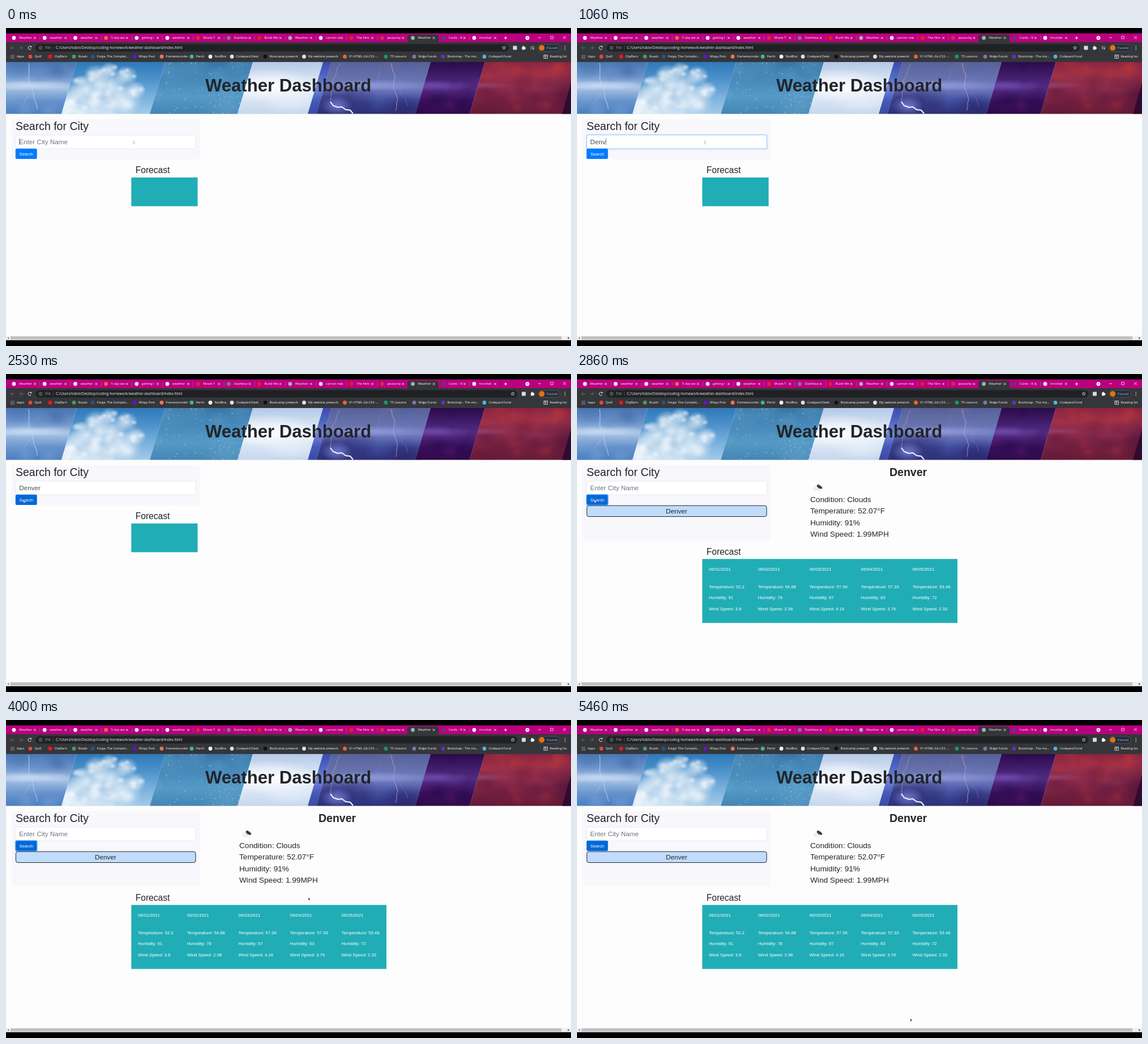
Write an HTML page with a canvas that moves like this. It is 998 by 561 pixels and loops after 5.53 s.

```html
<!DOCTYPE html>
<html lang="en">
<head>
<meta charset="utf-8">
<title>Weather Dashboard</title>
<style>
html, body { margin: 0; width: 100%; height: 100%; overflow: hidden; background: #000; }
canvas { display: block; }
</style>
</head>
<body>
<canvas id="stage" width="998" height="561"></canvas>
<script>
const LOOP = 5530, STEP = 200 / 3;
const PAGE = '"Liberation Sans", Arial, sans-serif';
const UI = '"Open Sans", "Noto Sans", sans-serif';
const INK = '#212529';
const stage = document.getElementById('stage');
const screen = stage.getContext('2d');
const backdrop = document.createElement('canvas');
backdrop.width = 998;
backdrop.height = 561;
let c = backdrop.getContext('2d');

let seed = 7;
const rnd = () => (seed = seed * 16807 % 2147483647) / 2147483647;
const between = (a, b) => a + (b - a) * rnd();

// cy is the middle of the capital letters
function text(s, x, cy, size, color = INK, font = PAGE, weight = 400) {
  c.font = `${weight} ${size}px ${font}`;
  c.fillStyle = color;
  c.fillText(s, x, cy + size * .358);
}
function rect(x, y, w, h, color) {
  c.fillStyle = color;
  c.fillRect(x, y, w, h);
}
function round(x, y, w, h, r, fill, stroke, width = 1) {
  c.beginPath();
  c.roundRect(x, y, w, h, r);
  if (fill) { c.fillStyle = fill; c.fill(); }
  if (stroke) { c.strokeStyle = stroke; c.lineWidth = width; c.stroke(); }
}
function dot(x, y, r, color) {
  c.beginPath();
  c.arc(x, y, r, 0, 7);
  c.fillStyle = color;
  c.fill();
}
function line(points, color, width = .8) {
  c.beginPath();
  points.forEach(([x, y]) => c.lineTo(x, y));
  c.strokeStyle = color;
  c.lineWidth = width;
  c.stroke();
}
function shape(points, color) {
  c.beginPath();
  points.forEach(([x, y]) => c.lineTo(x, y));
  c.fillStyle = color;
  c.fill();
}
function cross(x, y, r, color, width) {
  line([[x - r, y - r], [x + r, y + r]], color, width);
  line([[x - r, y + r], [x + r, y - r]], color, width);
}
// soft spot of colour: rgb is "r,g,b"
function glow(x, y, rx, ry, rgb, alpha) {
  c.save();
  c.translate(x, y);
  c.scale(rx, ry);
  const g = c.createRadialGradient(0, 0, 0, 0, 0, 1);
  g.addColorStop(0, `rgba(${rgb},${alpha})`);
  g.addColorStop(.45, `rgba(${rgb},${alpha * .6})`);
  g.addColorStop(1, `rgba(${rgb},0)`);
  c.fillStyle = g;
  c.fillRect(-1, -1, 2, 2);
  c.restore();
}
function glows(n, x0, x1, y0, y1, size, rgb, alpha) {
  for (let i = 0; i < n; i++) {
    const r = between(size * .5, size);
    glow(between(x0, x1), between(y0, y1), r * 1.3, r, rgb, alpha);
  }
}
function bolt(x, y, dx, dy, n, color, width) {
  const points = [[x, y]];
  for (let i = 0; i < n; i++) {
    x += dx + between(-3, 3);
    y += dy + between(-1, 1);
    points.push([x, y]);
  }
  line(points, color, width);
}
// slanted strip of the banner between two top edges
const LEAN = 27, TOP = 60, BOTTOM = 151.4;
function strip(x0, x1, colors, paint) {
  c.save();
  c.beginPath();
  [[x0, TOP], [x1, TOP], [x1 - LEAN, BOTTOM], [x0 - LEAN, BOTTOM]].forEach(p => c.lineTo(...p));
  c.clip();
  const g = c.createLinearGradient(0, TOP, 0, BOTTOM);
  colors.forEach((col, i) => g.addColorStop(i / (colors.length - 1), col));
  rect(x0 - LEAN, TOP, x1 - x0 + LEAN, 92, g);
  if (paint) paint();
  c.restore();
}

function drawBanner() {
  strip(-1, 125, ['#4a76b4', '#6f98cf', '#a9c3e6', '#6592cb', '#4c7fc0'], () => {
    glows(10, 0, 125, 60, 88, 22, '60,100,160', .2);
    glows(8, 0, 110, 110, 150, 20, '130,168,216', .25);
    glow(40, 101, 85, 9, '222,234,250', .65);
    bolt(40, 62, .6, 7, 12, '#c3d7f3', .9);
    bolt(46, 100, -1.6, 6, 5, '#aec8ec', .6);
  });
  strip(125, 281, ['#2f79b9', '#4d92cb', '#79b0dd', '#a3cae8'], () => {
    const puffs = [
      [118, 128, 24], [142, 108, 22], [160, 84, 17], [184, 102, 23], [212, 84, 15],
      [205, 128, 25], [160, 138, 24], [228, 110, 14], [110, 146, 18], [182, 74, 12]
    ];
    puffs.forEach(([x, y, r]) => {
      glow(x, y, r * 1.4, r * 1.2, '255,255,255', .75);
      glows(3, x - r, x + r, y - r * .7, y + r * .7, r * .5, '250,252,255', .55);
    });
    glows(6, 110, 215, 115, 148, 11, '165,192,222', .35);
  });
  strip(281, 436, ['#3676a7', '#4689ba', '#559ac6', '#4485b4'], () => {
    glows(10, 260, 430, 60, 150, 28, '115,175,212', .25);
    for (let i = 0; i < 170; i++)
      dot(between(256, 436), between(60, 152), between(.3, 1.1), `rgba(225,240,252,${between(.15, .65)})`);
  });
  strip(436, 560, ['#b4c8e6', '#cddcf0', '#eef4fc', '#d8e4f4', '#c6d6ed'], () => {
    glow(465, 101, 85, 30, '255,255,255', .8);
    glow(500, 130, 50, 22, '238,245,255', .5);
  });
  strip(560, 575, ['#3d4cab', '#4d65c4', '#7484d8', '#4459b8', '#3b49a6']);
  strip(575, 750, ['#515f9b', '#6270ae', '#727dbf', '#424f9f', '#2d3079'], () => {
    glows(12, 560, 745, 62, 90, 26, '105,105,150', .25);
    glows(12, 560, 740, 118, 152, 28, '42,36,104', .35);
    glow(645, 101, 110, 10, '175,180,240', .5);
    glow(584, 137, 28, 18, '150,165,255', .6);
    line([[573, 130], [578, 137], [586, 140], [593, 139], [600, 144], [608, 145], [613, 151]], '#f5f5ff', 2);
    bolt(590, 63, -2, 7, 10, '#a8abe4', .6);
    bolt(680, 62, 1, 7, 12, '#b8a9e2', .8);
    bolt(688, 82, 3, 6, 9, '#927fc9', .5);
    bolt(663, 70, -2, 6, 6, '#938fd0', .4);
  });
  strip(750, 846, ['#2c0b4b', '#401b69', '#593089', '#3b1161', '#320a4b'], () => {
    glows(10, 725, 845, 65, 150, 20, '30,5,60', .25);
    glow(755, 101, 75, 9, '125,95,200', .55);
    glows(4, 730, 830, 118, 150, 18, '86,22,106', .3);
  });
  strip(846, 1026, ['#8a2440', '#9c2f47', '#8c2c4c', '#78213f', '#661a38'], () => {
    glows(12, 840, 998, 62, 92, 16, '188,58,56', .28);
    glows(12, 825, 998, 92, 150, 22, '86,20,60', .28);
    glows(6, 850, 970, 120, 142, 14, '168,48,62', .25);
    glow(840, 101, 55, 7, '170,90,150', .45);
    glow(998, 118, 42, 46, '52,10,48', .5);
    shape([[998, 97], [998, 152], [982, 152]], '#300a30');
  });
  text('Weather Dashboard', 352, 101, 31.1, INK, PAGE, 700);
}

function drawTabs() {
  const white = '#f4f4f6', red = '#e62117', gray = '#a9adb3';
  const tabs = [
    ['Weather', white], ['weather', white], ['weather', white], ['5 day we', '#e86a33'],
    ['getting l', '#dfe6f0'], ['weather', white], ['Movie T', '#e4252b'], ['Dashboa', '#777b82'],
    ['Build We', red], ['Weather', gray], ['cannot re', '#dfe6f0'], ['The Nim', red],
    ['javascrip', '#d32d4b'], ['Weather', gray], ['Cards - R', '#563d7c'], ['tmorbel', white]
  ];
  rect(0, 9.5, 998, 15.5, '#b9007f');
  round(709, 11.5, 55, 16, 4, '#35363a');
  tabs.forEach(([name, color], i) => {
    const x = 14 + i * 54.2;
    dot(x, 17.5, 3.4, color);
    c.save();
    c.beginPath();
    c.rect(x + 8, 10, 28, 15);
    c.clip();
    text(name, x + 9, 17.3, 5.8, '#fff', UI);
    c.restore();
    cross(x + 37, 17.5, 1.8, '#fff', .9);
    if (i < 15 && i != 12 && i != 13) rect(x + 45.5, 13.5, .6, 8, '#d65bad');
  });
  line([[880, 17.5], [885, 17.5]], '#fff', 1);
  line([[882.5, 15], [882.5, 20]], '#fff', 1);
  dot(921, 17.5, 3.4, '#fff');
  shape([[919.5, 16.8], [922.5, 16.8], [921, 18.8]], '#b9007f');
  line([[940, 17], [945, 17]], '#fff');
  round(961.8, 14.5, 4.5, 4.5, 0, null, '#fff', .7);
  cross(986.5, 16.8, 2.5, '#fff', .8);
}

function drawToolbar() {
  rect(0, 25, 998, 35, '#35363a');
  line([[14.5, 35], [8, 35]], '#73767b');
  line([[11, 32], [8, 35], [11, 38]], '#73767b');
  line([[23, 35], [29.5, 35]], '#73767b');
  line([[26.5, 32], [29.5, 35], [26.5, 38]], '#73767b');
  c.beginPath();
  c.arc(42, 35, 2.9, .5, 5.6);
  c.strokeStyle = '#e8eaed';
  c.lineWidth = 1;
  c.stroke();
  shape([[42.5, 34], [45.2, 34], [45.2, 31.3]], '#e8eaed');

  const marks = [
    [43, '#e5463c', 'Quill'], [78, '#f01818', 'ClipBarn'], [120, '#4a9c5d', 'Roads'],
    [153, '#2b5577', 'Forge, The Complet...'], [227, '#6512d0', 'Wispy Post'],
    [275, '#f2725c', 'Framerecorder'], [328, '#48b58b', 'Perch'], [361, '#f4f4f6', 'NodBox'],
    [399, '#dfe1e5', 'Codeyard Desk'], [458, '#111', 'Bootcamp prework'],
    [526.5, '#dfe1e5', 'My website prework'], [598.5, '#f0652f', '01-HTML-Git-CSS -...'],
    [671, '#159a68', 'T5 Lessons'], [721, '#7777a5', 'Ridge Funds'],
    [772, '#6a2bc5', 'Bootstrap - The mo...'], [845, '#4fb7d3', 'Codeyard Fund']
  ];
  for (let i = 0; i < 9; i++)
    rect(8 + i % 3 * 2.5, 47.5 + (i / 3 | 0) * 2.5, 1.6, 1.6, ['#e5584b', '#57a868', '#5b8def'][i % 3]);
  text('Apps', 19, 50.3, 5.65, '#fff', UI);
  marks.forEach(([x, color, name]) => {
    dot(x, 50.5, 3.4, color);
    text(name, x + 7.5, 50.3, 5.65, '#fff', UI);
  });
  round(950, 47.5, 6.5, 6, 0, null, '#e8eaed', .8);
  rect(950, 49.5, 6, .7, '#e8eaed');
  rect(952.5, 47.5, .7, 6, '#e8eaed');
  text('Reading list', 960.5, 50.3, 5.65, '#fff', UI);
}

function drawStatic() {
  rect(0, 0, 998, 561, '#000');
  drawTabs();
  drawToolbar();
  rect(0, 60, 998, 490.5, '#fdfdfd');
  drawBanner();
  rect(0, 543, 998, 7.5, '#f1f1f1');
  rect(8, 544, 973, 5.6, '#c1c1c1');
  shape([[2.5, 547], [5, 545], [5, 549]], '#777');
  shape([[995, 547], [992.5, 545], [992.5, 549]], '#333');
}

// right part of the toolbar, which shifts when the media icon goes
function drawAddress(media) {
  const shift = media ? 0 : 15.5;
  round(52, 28.5, 836 + shift, 13, 6.5, '#202124');
  c.beginPath();
  c.arc(61, 35, 2.8, 0, 7);
  c.strokeStyle = '#9aa0a6';
  c.lineWidth = .7;
  c.stroke();
  rect(60.6, 34.3, .8, 2.3, '#9aa0a6');
  rect(60.6, 33, .8, .8, '#9aa0a6');
  text('File', 69, 34.8, 6.4, '#9aa0a6', UI);
  rect(83, 31.5, .6, 7, '#5f6368');
  text('C:/Users/tobin/Desktop/coding-homework/weather-dashboard/index.html', 88, 34.8, 6.46, '#f1f3f4', UI);

  const star = [];
  for (let i = 0; i < 11; i++) {
    const a = i * Math.PI / 5 - Math.PI / 2, r = i % 2 ? 1.4 : 3.3;
    star.push([879.7 + shift + r * Math.cos(a), 35 + r * Math.sin(a)]);
  }
  line(star, '#e8eaed', .7);
  round(895.5 + shift, 31.5, 7, 7, 1, '#d9dbde');
  round(911.5 + shift, 33, 5.2, 5.2, .6, '#f4f4f6');
  dot(914 + shift, 32.7, 1.3, '#f4f4f6');
  dot(917 + shift, 35.5, 1.3, '#f4f4f6');
  if (media) {
    [32.5, 34.5, 36.5].forEach((y, i) => rect(926.5, y, i < 2 ? 5 : 3, .8, '#b5b8bc'));
    dot(931.5, 37, 1.2, '#b5b8bc');
    rect(932.2, 32.5, .7, 4.5, '#b5b8bc');
  }
  round(939.5, 28.8, 39, 12.4, 6.2, '#292c34', '#55657f', .7);
  dot(946.3, 35, 5, '#e8710a');
  text('Paused', 955, 34.8, 5.7, '#8ab4f8', UI);
  [32.3, 35, 37.7].forEach(y => dot(987.3, y, .8, '#e8eaed'));
}

function drawSearch(k, done, hover) {
  round(10, 161, 332, done ? 132.5 : 70.5, 2, '#f7f7fc');
  text('Search for City', 17, 173, 19.5);

  const focus = k < 36 ? Math.min(k / 4, 1) : Math.max(0, 1 - (k - 35) / 3);
  round(17.2, 188.8, 318, 24.2, 2.5, '#fff', '#dfe2e8', .7);
  if (focus) {
    c.globalAlpha = focus;
    round(16.8, 188.4, 318.8, 25, 3, null, '#b3d6fb', 1.8);
    c.globalAlpha = 1;
  }
  const typed = done ? '' : 'Denver'.slice(0, [11, 12, 14, 16, 18, 19].filter(n => k >= n).length);
  text(typed || 'Enter City Name', 23.3, 200.7, 11.7, typed ? '#495057' : '#6c757d');
  if (k < 7 || k > 10 && k < 34) {
    const x = 23.5 + (typed && c.measureText(typed).width);
    rect(x, 194.5, .7, 12, '#444');
  }

  round(16.8, 212.8, 37.9, 18.3, 2.5, hover || done ? '#0069d9' : '#007bff');
  if (done && k < 80) round(16.5, 212.5, 38.6, 18.9, 3, null, '#7fb8f5', 1.4);
  text('Search', 23.5, 222, 7.8, '#fff');
}

const days = [
  [233, '52.2', 91, '3.8'], [319.7, '54.88', 78, '2.98'], [410.5, '57.36', 67, '4.16'],
  [501.6, '57.33', 63, '3.76'], [592.5, '53.46', 72, '2.33']
];
function drawResults() {
  round(17.4, 232.2, 317.6, 19.3, 3.5, '#c0dcfa', '#20262d', 1);
  text('Denver', 157, 241.8, 11.7);
  text('Denver', 552, 173, 19.5, INK, PAGE, 700);

  dot(421, 202.5, 3.6, '#eeeef0');
  dot(425, 201, 4.2, '#eeeef0');
  rect(418, 202, 13, 4, '#eeeef0');
  dot(426, 197.5, 2.4, '#3b3b40');
  dot(428.5, 199.3, 2.8, '#3b3b40');
  dot(431.3, 200.7, 2, '#3b3b40');

  ['Condition: Clouds', 'Temperature: 52.07°F', 'Humidity: 91%', 'Wind Speed: 1.99MPH']
    .forEach((s, i) => text(s, 412, 221.3 + i * 20.2, 13.65));

  rect(221.3, 326.3, 450.7, 112.9, '#21adb5');
  days.forEach(([x, temp, humidity, wind], i) => {
    text(`06/0${i + 1}/2021`, x, 343.8, 7.75, '#fff');
    text('Temperature: ' + temp, x, 375.2, 7.75, '#fff');
    text('Humidity: ' + humidity, x, 394.5, 7.75, '#fff');
    text('Wind Speed: ' + wind, x, 414, 7.75, '#fff');
  });
}

// pointer stops: step, x, y
const path = [
  [0, 226, 202], [25, 226, 202], [26, 226, 203], [34, 32, 224], [47, 32, 224],
  [53, 414, 187], [57, 452, 262], [64, 664, 398], [73, 664, 398], [82, 590, 529]
];
function pointerAt(k) {
  const i = Math.max(1, path.findIndex(p => p[0] >= k));
  const [k0, x0, y0] = path[i - 1], [k1, x1, y1] = path[i];
  let f = (k - k0) / (k1 - k0);
  f = f * f * (3 - 2 * f);
  return [x0 + (x1 - x0) * f, y0 + (y1 - y0) * f];
}
function drawPointer(x, y, hand) {
  if (hand) {
    shape([[x - 1.5, y - 3], [x - .3, y - 3], [x + .2, y - .8], [x + 2.8, y], [x + 2.2, y + 3.2], [x - 1, y + 3.2], [x - 2.8, y + .6], [x - 1.3, y + .4]], '#55408c');
    shape([[x - 1.1, y - 2.3], [x - .4, y - .2], [x + 2, y + .5], [x + 1.6, y + 2.5], [x - .6, y + 2.5], [x - 1.6, y + .9]], '#f3e4f2');
  } else if (x > 17 && x < 335 && y > 189 && y < 213) {
    rect(x - .4, y - 2.8, .8, 5.6, '#999');
    rect(x - 1.3, y - 3, 2.6, .6, '#aaa');
    rect(x - 1.3, y + 2.4, 2.6, .6, '#aaa');
  } else {
    shape([[x - 1.2, y - 2.6], [x + 2.2, y + .8], [x + .5, y + 1], [x + 1.1, y + 2.6], [x + .1, y + 2.8], [x - 1.2, y + 1.6]], '#6139a8');
  }
}

drawStatic();
c = screen;

function frame(now) {
  const k = Math.min(82, Math.floor((now % LOOP + 7) / STEP));
  const done = k >= 41;
  const [x, y] = pointerAt(k);
  const hover = x > 17 && x < 55 && y > 213 && y < 231;
  c.drawImage(backdrop, 0, 0);
  drawAddress(k < 34);
  drawSearch(k, done, hover);
  text('Forecast', 228.7, done ? 313.2 : 250.7, 15.6);
  if (done) drawResults();
  else rect(221.3, 263.7, 117.2, 50.7, '#21adb5');
  drawPointer(x, y, hover);
  requestAnimationFrame(frame);
}
requestAnimationFrame(frame);
</script>
</body>
</html>
```
